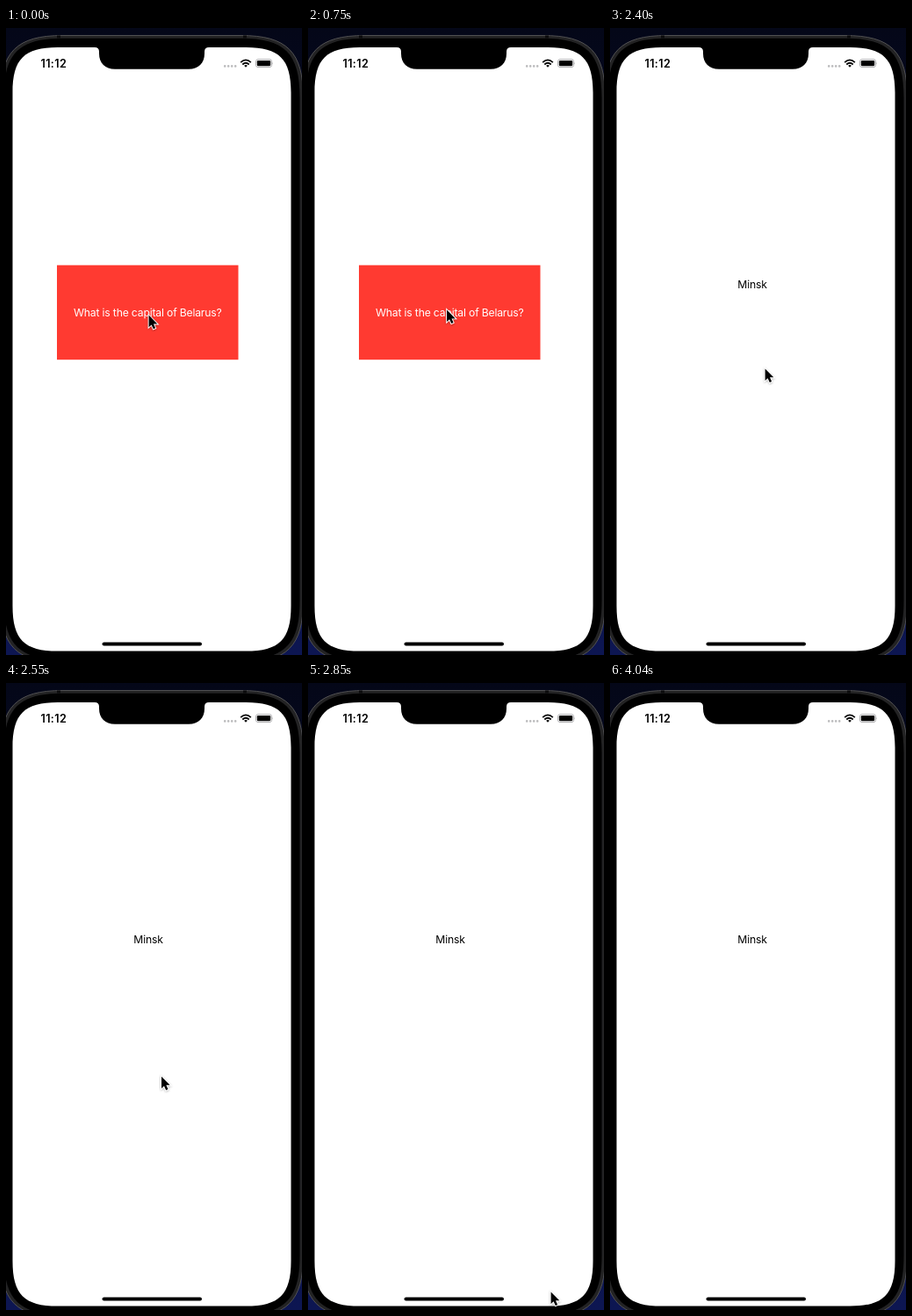
These frames come from a looping animation (337 by 713 pixels, 4060 ms). An HTML page:

```html
<!DOCTYPE html>
<html lang="en">
<head>
<meta charset="utf-8">
<title>Flash card</title>
<style>
  html, body { margin: 0; width: 100%; height: 100%; overflow: hidden; background: #060a28; }
  svg { display: block; width: 337px; height: 713px; }
  text { font: 12.2px Inter, "Liberation Sans", sans-serif; letter-spacing: -.18px; }
  .mid { text-anchor: middle; }
  #time { font-size: 12.6px; font-weight: 600; letter-spacing: .35px; }
</style>
</head>
<body>
<svg viewBox="0 0 337 713">
  <defs>
    <linearGradient id="night" x2="0" y2="1">
      <stop stop-color="#040718"/>
      <stop offset="1" stop-color="#0d1652"/>
    </linearGradient>
    <filter id="shadow" x="-50%" y="-50%" width="200%" height="200%">
      <feDropShadow dx="0" dy=".8" stdDeviation=".8" flood-opacity=".35"/>
    </filter>
  </defs>
  <rect width="337" height="713" fill="url(#night)"/>

  <!-- phone body -->
  <path id="frame" fill="#232324" stroke="#505052"/>
  <path id="bezel"/>
  <path d="M58 10h4M270 10h4" stroke="#0b0b0c" stroke-width="3"/>
  <path id="screen" fill="#fff"/>
  <path d="M101 21V22Q106 22 106 27V29C106 40 113 46.7 124 46.7H208C219 46.7 226 40 226 29V27Q226 22 231 22V21Z"/>

  <!-- status bar -->
  <text id="time" x="39.5" y="45">11:12</text>
  <path d="M249.2 43.4h13" stroke="#bcbcbe" stroke-width="2.6" stroke-linecap="round" stroke-dasharray="0 4"/>
  <g fill="none" stroke="#000" stroke-width="1.8">
    <path d="M267.2 39.2Q273 33.6 278.8 39.2M269.3 41.5Q273 38 276.7 41.5"/>
    <path d="M271.1 42.7Q273 41.1 274.9 42.7L273 44.7Z" fill="#000" stroke="none"/>
  </g>
  <rect x="284.5" y="35.6" width="18" height="9" rx="2.5" fill="none" stroke="#a8a8aa" stroke-width=".9"/>
  <rect x="285.8" y="36.9" width="15.4" height="6.4" rx="1.4"/>
  <path d="M303.4 38.7Q304.6 40.1 303.4 41.5Z" fill="#a8a8aa"/>
  <rect x="109.5" y="698.6" width="113.5" height="4" rx="2"/>

  <!-- card sides -->
  <g id="front" fill="#fff">
    <rect x="58" y="269.7" width="206.5" height="107.5" fill="#ff3a31"/>
    <text class="mid" x="161.3" y="328">What is the capital of Belarus?</text>
  </g>
  <text id="back" class="mid" x="162" y="296.3">Minsk</text>

  <g id="cursor" filter="url(#shadow)">
    <path d="M0 0V13.6L3 10.8L5.2 15.6L7.5 14.6L5.4 9.9H9.7Z" stroke="#fff" stroke-width="1.8" paint-order="stroke"/>
  </g>
</svg>
<script>
const $ = id => document.getElementById(id);
const LOOP = 4060, STEP = 150, FLIP = 1650, SWEEP = 2400, LEAVE = 3000;

// rectangle whose corners ease in and out of the straight sides
function smoothRect(id, x, y, w, h, r) {
  const e = 1.3 * r, k = .335 * r, c = e - k;
  $(id).setAttribute("d", `M${x} ${y + e}
    c0 ${-c} ${k} ${-e} ${e} ${-e} h${w - 2 * e}
    c${c} 0 ${e} ${k} ${e} ${e} v${h - 2 * e}
    c0 ${c} ${-k} ${e} ${-e} ${e} h${2 * e - w}
    c${-c} 0 ${-e} ${-k} ${-e} ${-e}z`);
}
smoothRect("frame", -6.5, 8.5, 345, 713, 55);
smoothRect("bezel", -2.5, 11.7, 337, 706.6, 51.5);
smoothRect("screen", 7.5, 22, 317, 686.5, 39.5);

// a small nudge, then a sweep off the bottom corner, both seen in whole steps
const sweep = [[176.6, 387.4], [177, 447.4], [186.6, 471.4], [276.6, 692.4]];

function cursorAt(t) {
  if (t >= SWEEP) return sweep[Math.min(3, Math.floor((t - SWEEP) / STEP))];
  const u = Math.min(1, Math.max(0, (Math.floor(t / STEP) * STEP - 400) / 225));
  const ease = u * u * (3 - 2 * u);
  return [162.6 - 4.5 * ease, 326.6 - 6.1 * ease];
}

const show = (id, on) => $(id).setAttribute("visibility", on ? "visible" : "hidden");

function draw(t) {
  show("front", t < FLIP);
  show("back", t >= FLIP);
  show("cursor", t < LEAVE);
  $("cursor").setAttribute("transform", `translate(${cursorAt(t)})`);
}

const start = performance.now();
function tick() {
  draw((performance.now() - start) % LOOP);
  requestAnimationFrame(tick);
}
tick();
</script>
</body>
</html>
```
